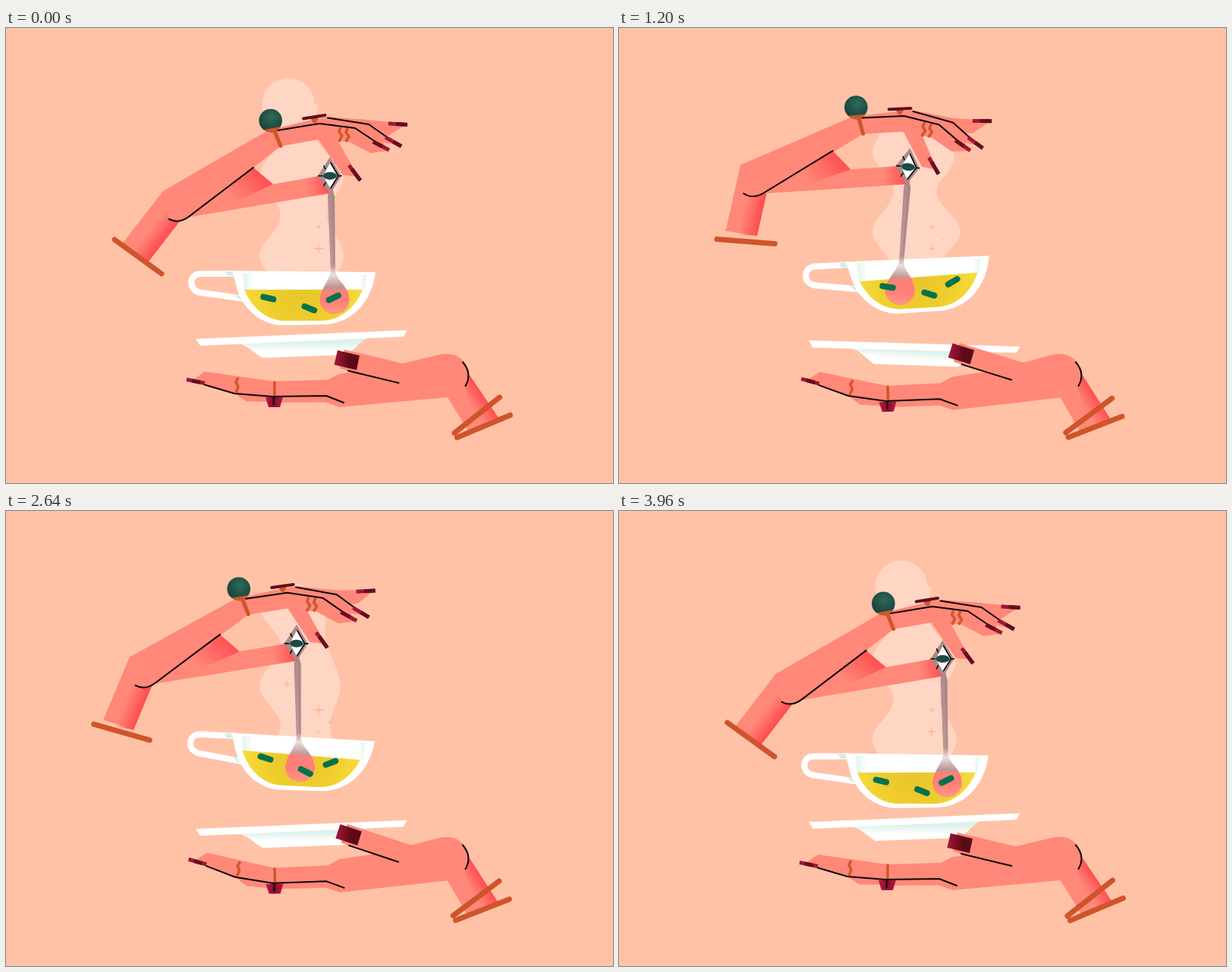
These frames come from a looping animation (800x600 px, 4 s). An HTML page:

```html
<!DOCTYPE html>
<html lang="en">
<head>
<meta charset="utf-8">
<title>Tea</title>
<style>
html, body { margin: 0; width: 100%; height: 100%; overflow: hidden; background: #ffc2a7; }
svg { display: block; width: 100%; height: 100%; }
.skin { fill: #ff8878; }
.ink { fill: none; stroke: #0c0608; stroke-width: 2; stroke-linecap: round; stroke-linejoin: round; }
.band { fill: none; stroke: #d0542a; stroke-width: 7; stroke-linecap: round; }
.ring { fill: none; stroke: #d0582b; stroke-width: 3.6; stroke-linejoin: round; }
.thin { stroke-width: 1.6; }
.wide { stroke-width: 5; }
.gold { fill: #d0582b; }
.nail { stroke: #a01536; stroke-width: 5; }
.tip { stroke: #650d1f; stroke-width: 5; }
.leaf { stroke: #04724c; stroke-width: 8; stroke-linecap: round; }
.plus { stroke: #ffbc99; stroke-width: 1.8; }
.steam { fill: #ffd5c3; }
</style>
</head>
<body>
<svg viewBox="0 0 800 600">
  <defs>
    <linearGradient id="shade" gradientUnits="userSpaceOnUse" x1="208" y1="282" x2="189" y2="267">
      <stop offset="0" stop-color="#ff4a4e"/><stop offset="1" stop-color="#ff4a4e" stop-opacity="0"/>
    </linearGradient>
    <linearGradient id="foldShade" href="#shade" x1="342" y1="190" x2="300" y2="228"/>
    <linearGradient id="endShade" href="#shade" x1="428" y1="206" x2="396" y2="210"/>
    <linearGradient id="cuffShade" href="#shade" x1="632" y1="486" x2="613" y2="499"/>
    <linearGradient id="dark"><stop offset="0" stop-color="#a81638"/><stop offset=".6" stop-color="#5c0a18"/></linearGradient>
    <linearGradient id="gemFill"><stop offset="0" stop-color="#c3183f"/><stop offset=".5" stop-color="#850f2c"/><stop offset="1" stop-color="#c3183f"/></linearGradient>
    <radialGradient id="orb" cx=".55" cy=".35" r=".7"><stop offset="0" stop-color="#2f6958"/><stop offset="1" stop-color="#133f39"/></radialGradient>
    <linearGradient id="metal" gradientUnits="userSpaceOnUse" x1="0" y1="210" x2="0" y2="350">
      <stop offset="0" stop-color="#b08a8b"/><stop offset=".74" stop-color="#c09797"/>
      <stop offset=".82" stop-color="#ebe0df"/><stop offset=".94" stop-color="#bf9492"/>
    </linearGradient>
    <linearGradient id="pink" x2="0" y2="1"><stop offset=".7" stop-color="#ff7f7a"/><stop offset="1" stop-color="#fa9a83"/></linearGradient>
    <radialGradient id="tea" gradientUnits="userSpaceOnUse" cx="390" cy="350" r="85">
      <stop offset="0" stop-color="#e9c52c"/><stop offset=".5" stop-color="#efcd2c"/><stop offset="1" stop-color="#f8de3d"/>
    </radialGradient>
    <linearGradient id="mint"><stop offset="0" stop-color="#e0f4ec"/><stop offset="1" stop-color="#fff"/></linearGradient>
    <linearGradient id="mintDown" x2="0" y2="1"><stop offset=".2" stop-color="#dcf1ea"/><stop offset=".65" stop-color="#fff"/></linearGradient>
    <path id="bowlPath" d="M312,322 L475,322 C474,350 452,386 415,386 L364,386 C338,384 318,362 312,338 Z"/>
    <path id="pool" d="M270,345 H520 V430 H270 Z"/>
    <path id="spoonHead" d="M428,321 H434 C437,334 452,341 452.500,358 A19.500,19.500 0 0 1 413.500,358 C414,345 426,333 428,321 Z"/>
    <clipPath id="bowl"><use id="bowlClip" href="#bowlPath"/></clipPath>
    <clipPath id="under"><use id="poolClip" href="#pool"/></clipPath>
  </defs>
  <rect width="800" height="600" fill="#ffc2a7"/>
  <path id="steam" class="steam"/>
  <circle id="puff" class="steam" r="34.500"/>
  <g id="stars"></g>

  <g id="saucer">
    <path fill="url(#mintDown)" d="M303,416 C318,417 326,428 338,435 L448,431 C458,427 464,415 476,409 Z"/>
    <path fill="#fff" d="M250,410 L528.500,398.500 L524,407 L256,419 Z"/>
  </g>

  <g id="cup">
    <path fill="none" stroke="#fff" stroke-width="8" d="M303,324 H257 C240,324 240,347 257,349 L314,357"/>
    <path fill="#d5efe6" d="M288,321 H301 V327 H292 Z M300,352 L308,353 L311,360 Z"/>
    <path fill="#fff" d="M298,320 L487,322 C482,362 455,391 417,391 L362,392 C335,390 310,370 303,338 Z"/>
    <path fill="url(#mint)" d="M312,323 H327 V347 H314 Z"/>
    <path fill="url(#mint)" transform="translate(788) scale(-1 1)" d="M313,325 H322 V347 H316 Z"/>
  </g>

  <g id="spoon">
    <path fill="url(#metal)" d="M428,205 L433,222 L434,322 H428 L424,222 Z"/>
    <path fill="#a17c80" d="M429,212 L433,222 L434,316 L431,310 Z" opacity=".45"/>
    <use href="#spoonHead" fill="url(#metal)"/>
  </g>
  <g clip-path="url(#bowl)">
    <use id="liquid" href="#pool" fill="url(#tea)"/>
    <g clip-path="url(#under)"><use id="dip" href="#spoonHead" fill="url(#pink)"/></g>
  </g>
  <g id="leaves"></g>

  <g id="upper">
    <path class="skin" d="M152,286 L207,215 L240,238 L228,256 L187,309 Z"/>
    <path fill="url(#shade)" d="M207,240 L228,256 L187,309 L162,297 Z"/>
    <path id="band" class="band" d="M143,279 L205,324"/>
  </g>
  <g id="arm">
    <path class="skin" d="M207,215 L347,134 L362,156 L326,184 L242,249 Q228,259 215,252 Z"/>
    <g id="pinch">
      <path class="skin" d="M238,250 L326,184 L352,206 L414,195 L431,214 L427,218 Z"/>
      <path fill="url(#foldShade)" d="M250,241 L326,184 L352,206 L300,230 Z"/>
      <path fill="url(#endShade)" d="M385,200 L414,195 L431,214 L427,218 L385,224 Z"/>
      <path class="ink" d="M215,252 Q228,259 242,248 L326,184"/>
    </g>
    <g id="foreThumb">
      <path class="skin" d="M411,146 L437,148 L464,196 L444,194 Z"/>
      <path class="nail" d="M452,181 L467,201"/>
      <path class="tip" d="M456,186.300 L467,201"/>
    </g>
    <g id="lift">
      <path class="skin" d="M465,120 L505,124 L526,128 L504,142 L470,142 Z"/>
      <path class="nail" d="M504,126 L529,127.500"/>
      <path class="tip" d="M514,126.600 L529,127.500"/>
    </g>
    <path class="skin" d="M346,135 L395,123 L424,117 L480,121.500 L495,138 L519,155 L497,151 L502,162 L481,165 L452,150 L412,147 L361,156 L340,165 Z"/>
    <path class="ink" d="M358,135 L413,126 L460,132 L490,152 M424,118.500 L478,127 L505,146"/>
    <path class="nail" d="M500,144 L521,156 M484,150 L505,161"/>
    <path class="tip" d="M510,149.700 L521,156 M484,150 L496,156.300"/>
    <path class="ring" d="M441,131 l-2,6 4,5 -4,8 M450,132 l-2,6 4,5 -4,7"/>
    <path class="gold" d="M401,119 L412,117 L409,125 L405,125 Z"/>
    <path d="M392,119.500 L420.500,115" stroke="#650d1c" stroke-width="4" stroke-linecap="round"/>
    <path class="band wide" d="M354,136 L362,155.500"/>
    <circle cx="348.700" cy="122" r="15.300" fill="url(#orb)"/>
    <path class="gold" d="M339,134.500 L362,130 L355,138 L349,138 Z"/>
  </g>
  <g id="eye">
    <path fill="#a98a8a" d="M427,170 L442,195 L427,219 L411,195 Z"/>
    <path fill="#fff" d="M427,178 L437,195 L427,211 L418,195 Z"/>
    <path class="ink thin" d="M428,178 L438,195 L428,211 M417,195 H411.500 M437,195 H442 M419,182 L421,186 M419,208 L421,204"/>
    <ellipse cx="427" cy="195" rx="9" ry="5" fill="#1d4b43"/>
  </g>

  <g id="cuff">
    <path class="skin" d="M580,484 L600,444 L611,458 L649,514 L609,531 Z"/>
    <path fill="url(#cuffShade)" d="M600,460 L611,458 L649,514 L622,526 Z"/>
    <path class="band" d="M591,534 L650.500,487 M594.500,540 L664.500,510.500"/>
  </g>
  <g id="palm">
    <path class="skin" d="M350,466 L424,464 L440,456 L495,449 L522,442.500 L570,431 C590,427 600,434 606,444 Q611,458 606,473 L582,487 L440,500 L421,493.500 L345,494 Z"/>
    <g id="finger">
      <path class="skin" d="M262,453 L353,466 L354,493 L317,492.500 L301,482 L258,469 L248,463 Z"/>
      <path class="nail" d="M238,463.500 L262,468.500"/>
      <path class="tip" d="M245,465 L256,467.300"/>
      <path class="ink" d="M262,470.500 L301,482 L351,486"/>
      <path class="ring" d="M306,461 l-3,6 3,6 -3,8"/>
    </g>
    <path class="ring" d="M354,467 V486" stroke-linecap="round"/>
    <path fill="url(#gemFill)" d="M342,487 H365 L361,500 H346 Z"/>
    <path class="ink" d="M353,487 L352.500,496 M351,486 L422,485 L445,494"/>
  </g>
  <path class="ink" d="M602,440.500 Q615,456 605.500,472"/>
  <g id="thumb">
    <path class="skin" d="M446,424 L545,447.500 L535,468 L518,468 L450,452 L440,449 Z"/>
    <path fill="url(#dark)" d="M437,425 L466,432 L462,451 L432.500,444 Z"/>
    <path class="ink" d="M451,452 L517.500,468"/>
  </g>
</svg>
<script>
const LOOP = 4000, STEP = 40;
const TURNS = [0, 1000, 2050, 3060, LOOP];
const { sin, cos, PI } = Math;
const $ = id => document.getElementById(id);
const move = (x, y) => `translate(${x} ${y}) `;
const turn = (deg, x, y) => `rotate(${deg} ${x} ${y}) `;
const place = (css, ...ids) => ids.forEach(id => $(id).setAttribute('transform', css));

const ease = u => {
  u = Math.min(1, Math.max(0, u));
  return u * u * (3 - 2 * u);
};

// Eases through the four turning points of the stirring motion.
function swing(t, ...v) {
  const i = TURNS.findIndex(end => t < end) - 1;
  const a = v[i], b = v[(i + 1) % 4];
  return a + (b - a) * ease((t - TURNS[i]) / (TURNS[i + 1] - TURNS[i]));
}

function add(parent, cls) {
  const e = document.createElementNS('http://www.w3.org/2000/svg', 'path');
  e.setAttribute('class', cls);
  return $(parent).appendChild(e);
}

const leaves = [[347, 354.5, 13], [401, 368, 22], [433, 354, -26]].map(([x, y, tilt]) => {
  const el = add('leaves', 'leaf');
  el.setAttribute('d', 'M-6.800,0 H6.800');
  return { el, x, y, tilt };
});
const stars = [[412, 291, 3, .3], [412, 262.5, 4, 4], [370, 228.5, 1.5, 3.6], [428, 279, 1, 3.4]]
  .map(([x, y, size, phase]) => ({ el: add('stars', 'plus'), x, y, size, phase }));

function drawSteam(w) {
  const top = 92 - 26 * cos(w) + 13 * sin(w);
  const crest = 300 - 105 * w / (2 * PI);
  const left = [], right = [];
  for (let y = Math.min(130, top + 35); y < 345; y += 5) {
    const wave = cos(2 * PI * (y - crest) / 105);
    left.push([348 - 14 * wave, y]);
    right.unshift([434 - Math.max(0, 190 - y) * .35 + (11 + 5 * sin(w)) * wave, y]);
  }
  $('steam').setAttribute('d', 'M' + [...left, ...right].join('L') + 'Z');
  place(move(375.5 - 3.5 * cos(w), top + 34.5), 'puff');
  for (const { el, x, y, size, phase } of stars) {
    const r = Math.max(0, size + 2.6 * cos(w - phase));
    el.setAttribute('d', `M${x - r},${y}h${2 * r}M${x},${y - r}v${2 * r}`);
  }
}

function drawCup(w) {
  const cup = move(0, 14 * (cos(w) - 1)) + turn(-3.2 * sin(w), 424, 304);
  const pool = cup + turn(2.1 * sin(2 * w), 393, 345);
  place(cup, 'cup', 'bowlClip');
  place(pool, 'liquid', 'poolClip');
  for (const { el, x, y, tilt } of leaves) {
    const drift = move(x + 4 * sin(w - .3), y + 2 * cos(w - .6));
    el.setAttribute('transform', pool + drift + turn(tilt, 0, 0));
  }
}

function drawArm(t, bounce) {
  const shift = move(swing(t, 207, 157, 195, 144) - 207, swing(t, 216, 178, 211, 183) - 216);
  const arm = shift + turn(swing(t, 0, 8.2, -6.8, 6), 207, 216);
  const pinch = turn(-bounce, 240, 250);
  place(arm, 'arm');
  place(pinch, 'pinch');
  place(arm + pinch, 'spoon', 'dip', 'eye');
  place(move(0, -5 * bounce), 'foreThumb');
  place(turn(-10.5 * bounce, 478, 127), 'lift');
  place(shift + turn(swing(t, 0, -27, -7, -20), 207, 216), 'upper');
  place(move(-4 * bounce, 9 * bounce) + turn(-7 * bounce, 174, 301.5), 'band');
}

function drawLower(t, w, bounce) {
  const curl = 3.6 * (1 - cos(w)) - 1.3 * bounce;
  const rock = ease(t / 560) - ease((t - 560) / 1740);
  place(move(0, 13 * bounce) + turn(5.8 * rock, 389, 404.5), 'saucer');
  place(turn(1.9 * bounce, 605, 462), 'cuff');
  place(turn(-1.6 * bounce, 590, 465), 'palm');
  place(turn(curl + 1.6 * bounce, 351, 486), 'finger');
  place(turn(curl * 1.07, 578, 460), 'thumb');
}

function render(t) {
  const w = 2 * PI * t / LOOP, bounce = sin(w) ** 2;
  drawSteam(w);
  drawCup(w);
  drawArm(t, bounce);
  drawLower(t, w, bounce);
}

function tick(now) {
  render(Math.floor(now % LOOP / STEP) * STEP);
  requestAnimationFrame(tick);
}
render(0);
requestAnimationFrame(tick);
</script>
</body>
</html>
```
